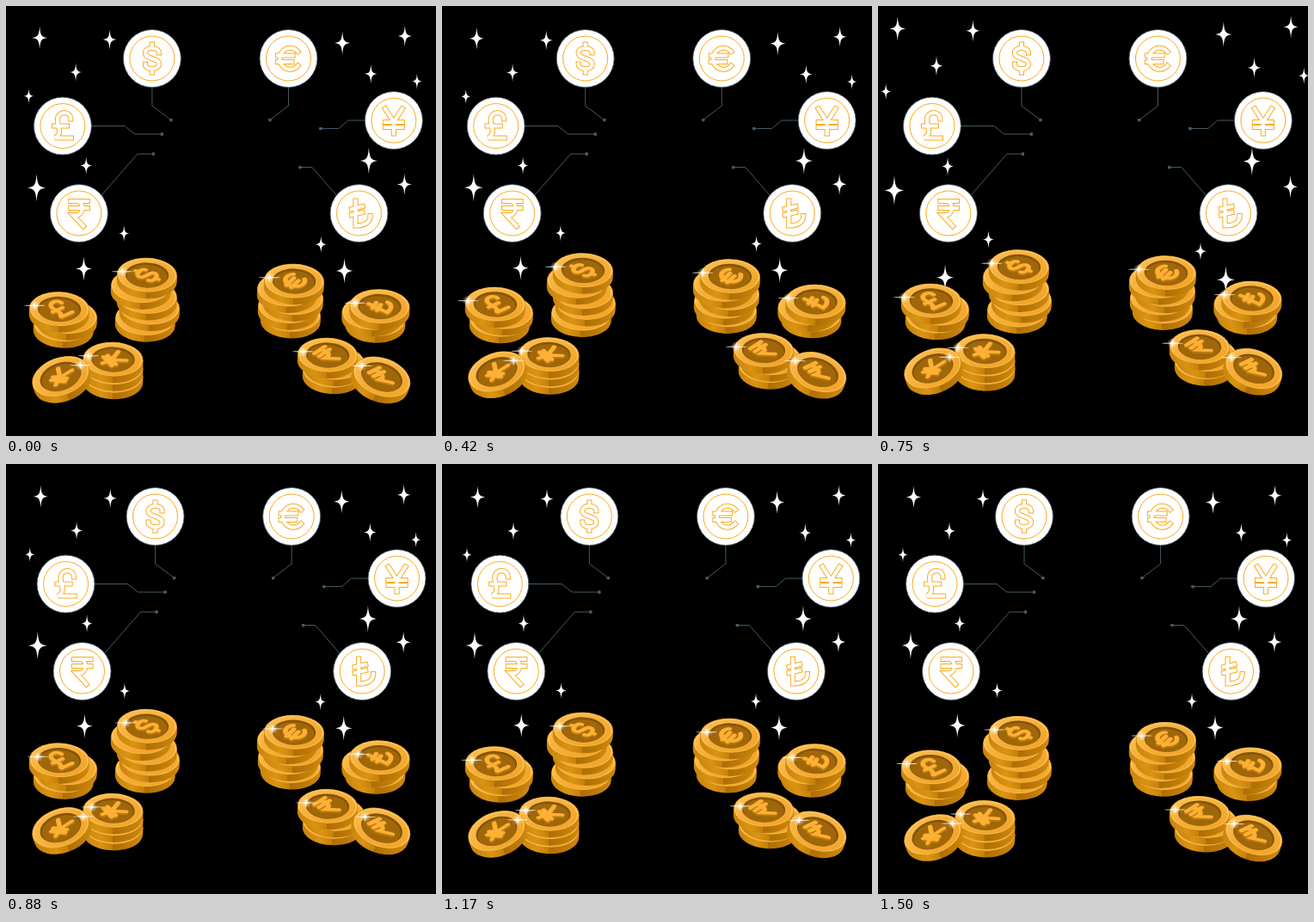
These frames come from a looping animation (500 by 500 pixels, 1.54 s). An HTML page:

```html
<!DOCTYPE html>
<html>
<head>
<meta charset="utf-8">
<style>
  html, body { margin: 0; height: 100%; overflow: hidden; background: #000; }
  svg { display: block; width: 100vw; height: 100vh; }
</style>
</head>
<body>
<svg viewBox="0 0 500 500" fill="none">
  <defs>
    <linearGradient id="side">
      <stop stop-color="#c9850c"/><stop offset=".3" stop-color="#da9413"/><stop offset=".5" stop-color="#c58009"/>
      <stop offset=".5" stop-color="#ad6e05"/><stop offset=".75" stop-color="#bd7a08"/><stop offset="1" stop-color="#d08a0e"/>
    </linearGradient>
    <linearGradient id="face" x2="1" y2="1">
      <stop stop-color="#fcc055"/><stop offset=".5" stop-color="#f6ae37"/><stop offset="1" stop-color="#f0a325"/>
    </linearGradient>
    <radialGradient id="glow">
      <stop stop-color="#fff" stop-opacity=".85"/><stop offset="1" stop-color="#ffe0a0" stop-opacity="0"/>
    </radialGradient>
    <path id="star" fill="#fff" d="M0-1C.06-.2 .15-.08 .66 0C.15.08 .06.2 0 1C-.06.2-.15.08-.66 0C-.15-.08-.06-.2 0-1"/>
  </defs>
  <g id="badges"></g>
  <g id="stars"></g>
  <g id="stacks"><g id="coins"></g><g id="glints"></g></g>
</svg>
<script>
const $ = id => document.getElementById(id);

const glyphs = {
  dollar: 'M8-6.5C8-14-8-14-8-6.5C-8 1 8-1 8 6.5C8 14-8 14-8 6.5M0-12.5V-16.5M0 12.5V16.5',
  euro: 'M11-8A12 12.5 0 1 0 11 8.5M-12.5-3.5H5M-12.5 4H4',
  pound: 'M9.5-8C9.5-18-6-18-6-7C-6-1-3 3-4 8Q-5 12-9 14H10M-10 0H5',
  yen: 'M-10-13.5L0 2L10-13.5M0 2V15.5M-10 2H10M-10 8H10',
  rupee: 'M-9.5-14H10M-9.5-6H10M-9.5-14H-3C6-14 6 2-3 2H-7L5 15',
  lira: 'M-4-14.5V14.5C6 14.5 13 11 13 3M-8.5-5L4-8M-8.5 2L4-1'
};

// White badges: glyph, centre, connector drawn from the centre
const badges = [
  ['dollar', 170, 61, 'v55l22 16.5'],
  ['euro', 328.6, 61, 'v55l-21.6 16.5'],
  ['pound', 66, 139.5, 'h72l12 9.5h31.5'],
  ['yen', 451, 133, 'h-53l-11 9.5h-21'],
  ['rupee', 85, 241, 'v9l68-78h18.5'],
  ['lira', 410.6, 241, 'v9l-54.6-62.5h-14']
];
$('badges').innerHTML = `<marker id="dot" viewBox="-2 -2 4 4" markerWidth="4" markerHeight="4">
    <circle r="2" fill="#455a64"/></marker>` +
  badges.map(([name, x, y, line]) => `<g transform="translate(${x} ${y})" stroke="#fbaa1d">
    <path d="M0 0${line}" stroke="#455a64" marker-end="url(#dot)"/>
    <circle r="33.5" fill="#fff" stroke="#455a64" stroke-width=".8"/>
    <circle r="26"/>
    <path d="${glyphs[name]}" stroke-width="6.2" stroke-linecap="square"/>
    <path d="${glyphs[name]}" stroke-width="4.2" stroke-linecap="square" stroke="#fff"/>
  </g>`).join('');

function coin(x, y, name, spin, tilt = 2, rx = 35, ry = 20) {
  const oval = (k, fill, dy = 0) => `<ellipse cy="${dy}" rx="${rx * k}" ry="${ry * k}" fill="${fill}"/>`;
  const mark = (dy, color) => `<path d="${glyphs[name]}" stroke="${color}" stroke-width="6" stroke-linecap="round"
    transform="translate(0 ${dy}) scale(1 .64) rotate(${spin}) scale(.92)"/>`;
  $('coins').innerHTML += `<g transform="translate(${x} ${y}) rotate(${tilt})">
    <path d="M${-rx} 0v7.5a${rx} ${ry} 0 0 0 ${2 * rx} 0v-7.5z" fill="url(#side)"/>
    ${oval(1, '#d58c14')}${oval(.98, '#fdc35c')}${oval(.93, 'url(#face)', .5)}
    ${name ? oval(.72, '#855406') + oval(.67, '#a0670a', 1.5) + mark(2, '#bd7a0b') + mark(0, '#fcb034') : ''}
  </g>`;
}

function glint(x, y) {
  $('glints').innerHTML += `<g transform="translate(${x} ${y})">
    <circle r="6.5" fill="url(#glow)"/>
    <ellipse rx="12.5" ry=".6" fill="#fff" opacity=".8"/>
    <use href="#star" transform="scale(6)" opacity=".8"/></g>`;
}

// Top coin at x, y; the shifts place the coins below it, from the bottom up
function stack(name, spin, x, y, pitch, shifts) {
  shifts.forEach((dx, i) => coin(x + dx, y + pitch * (shifts.length - i)));
  coin(x, y, name, spin);
  glint(x - 28.5, y - 4);
}

// A single coin leaning against a stack; side is 1 when the stack is on its right
function leaning(name, spin, x, y, side) {
  coin(x, y, name, spin, -20 * side, 34.5, 22);
  glint(x + 23 * side, y - 13);
}

stack('pound', -38, 62, 352.5, 9, [5, 9]);
stack('dollar', -62, 164, 313, 12.6, [-2, 3, 0, -7]);
stack('yen', 58, 124.5, 411, 9.5, [0, 0]);
leaning('yen', 38, 63.5, 431, 1);
stack('euro', -58, 335, 320, 9.8, [-4, -7, -1, -8]);
stack('lira', -56, 434.5, 349.5, 7.5, [-5, -9]);
stack('rupee', -48, 374, 406, 9, [6, 8]);
leaning('rupee', -58, 437, 431.5, -1);

// Star centres, largest first
const stars = [[38, 211], [420, 180], [392, 306.5], [92.3, 304], [389.6, 44.5], [41.5, 38.5], [461, 207], [461.5, 36.5],
  [122, 40.5], [422.4, 80], [83, 78], [95, 185.5], [365, 276], [138.5, 263.5], [475.4, 88.5], [29, 105.5]];
$('stars').innerHTML = stars.map(([x, y], i) =>
  `<use href="#star" transform="translate(${x} ${y}) scale(${16 * .96 ** i})"/>`).join('');

// Motion as functions of the cycle's progress p, from 0 to 1
const swings = [0, -1, 2, -4, 4, -4, 4, -4, 2, -1, 0];
function shake(p) {
  const i = Math.min(9, Math.floor(p * 10));
  return swings[i] + (swings[i + 1] - swings[i]) * (p * 10 - i);
}
const float = p => -10 * (1 - Math.abs(2 * p - 1));
const beat = p => 1 + Math.max(0, Math.min(p, (.3 - p) / 2), .1 - Math.abs(p - .5));

const LOOP = 1540, STEP = 1000 / 24, CYCLE = 1500;

function draw() {
  const step = Math.floor((performance.now() % LOOP + 4) / STEP);
  const p = Math.min(1, (step * STEP + 16.7) / CYCLE);
  const sway = `translate(${shake(p)} 0)`;
  $('badges').setAttribute('transform', sway);
  $('glints').setAttribute('transform', sway);
  $('stacks').setAttribute('transform', `translate(0 ${float(p)})`);
  $('stars').setAttribute('transform', `translate(252 173) scale(${beat(p)}) translate(-252 -173)`);
  requestAnimationFrame(draw);
}
draw();
</script>
</body>
</html>
```
